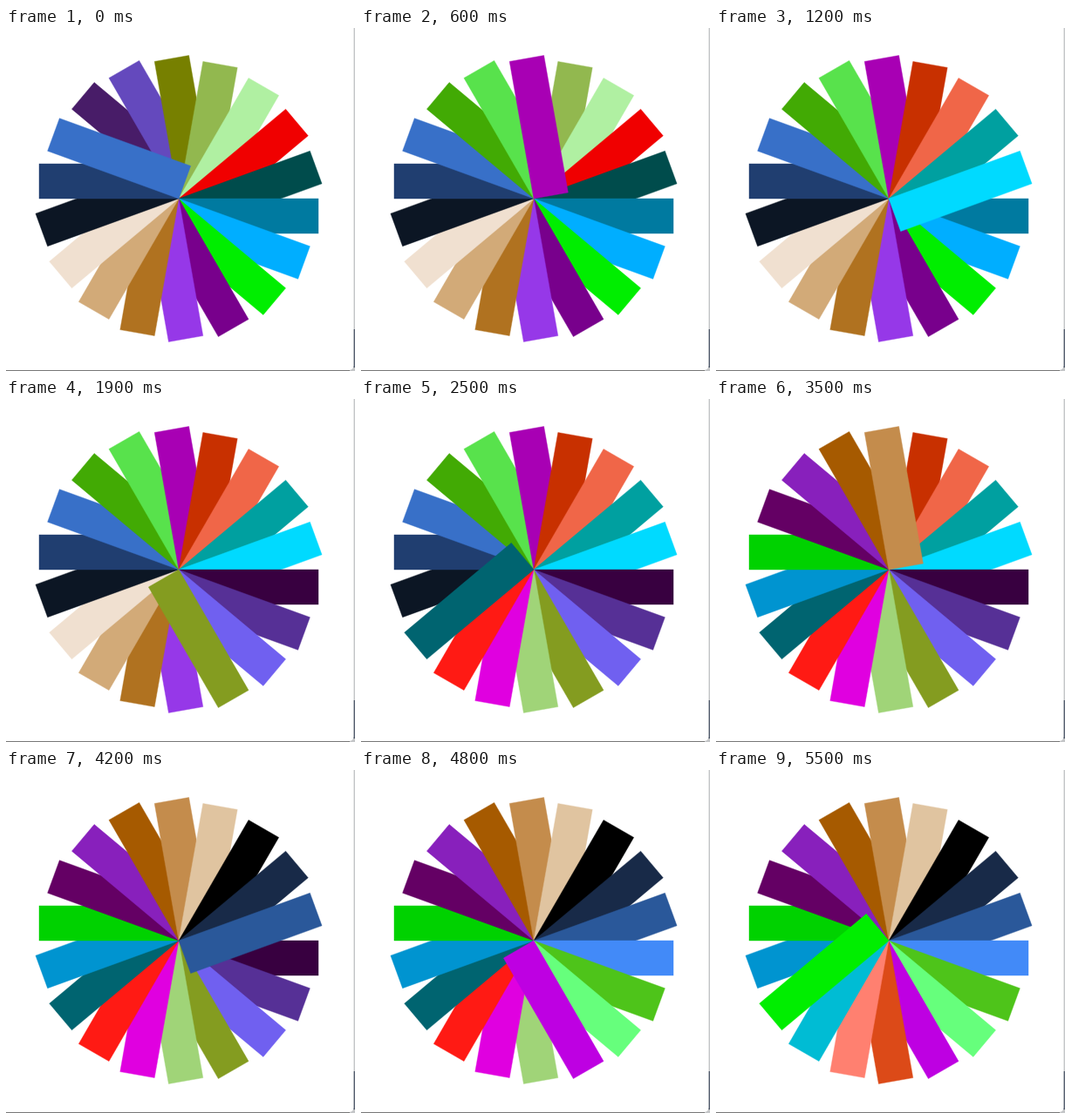
Animation of 400x394 px, one loop 5700 ms. Source, as an HTML page with a canvas:

```html
<!DOCTYPE html>
<html lang="en">
<head>
<meta charset="utf-8">
<title>Colour wheel</title>
<style>
  html, body { margin: 0; width: 100%; height: 100%; overflow: hidden; background: #fff; }
  canvas { display: block; }
</style>
</head>
<body>
<canvas id="stage" width="400" height="394"></canvas>
<script>
const ctx = document.getElementById('stage').getContext('2d');

const LOOP = 5700, TICK = 100;
const BARS_PER_MS = 6 / 1000, LEAD = 0.3;
const TURN = 18, FIRST_ANGLE = 220;

// One colour per bar, in drawing order.
const colours = `
  481c68 6449bd 778000 92b84f b0f0a2 f00000 004c4c 007aa0 00aeff
  00ee00 78008c 9638e8 b07220 d2aa78 f0e0d0 0c1624 203e70 3870c8
  42aa04 58e24c a800b4 c83000 f06648 00a0a0 00daff 380040 563096
  7060f0 849c20 a0d478 e000e0 ff1a14 006470 0094d0 00d200 640064
  8820bc a65a00 c48c4c e0c4a0 000000 182a48 2a589a 428af8 4ec41a
  66ff7c be00e2 dc4a18 ff8070 00bcd4 00ee00`.trim().split(/\s+/);

function drawWindow() {
  ctx.fillStyle = '#c4c6c8';
  ctx.fillRect(0, 0, 400, 394);
  ctx.fillStyle = '#566070';
  ctx.fillRect(398, 346, 2, 44);
  ctx.fillStyle = '#777';
  ctx.fillRect(0, 392, 394, 2);
  ctx.fillStyle = '#fff';
  ctx.beginPath();
  ctx.roundRect(0, 0, 398.5, 393, [0, 0, 5, 0]);
  ctx.fill();
}

function drawBar(index) {
  ctx.save();
  ctx.translate(198, 196);
  ctx.rotate((FIRST_ANGLE + index * 20) * Math.PI / 180);
  ctx.fillStyle = ctx.strokeStyle = '#' + colours[index];
  ctx.lineWidth = 0.4; // keeps the slanted edges crisp
  ctx.fillRect(0, 0, 160, 40);
  ctx.strokeRect(0, 0, 160, 40);
  ctx.restore();
}

function render(now) {
  const time = Math.floor(now % LOOP / TICK) * TICK;
  const first = Math.floor(time * BARS_PER_MS + LEAD);
  drawWindow();
  for (let i = first; i < first + TURN; i++) drawBar(i);
  requestAnimationFrame(render);
}

render(0);
</script>
</body>
</html>
```
